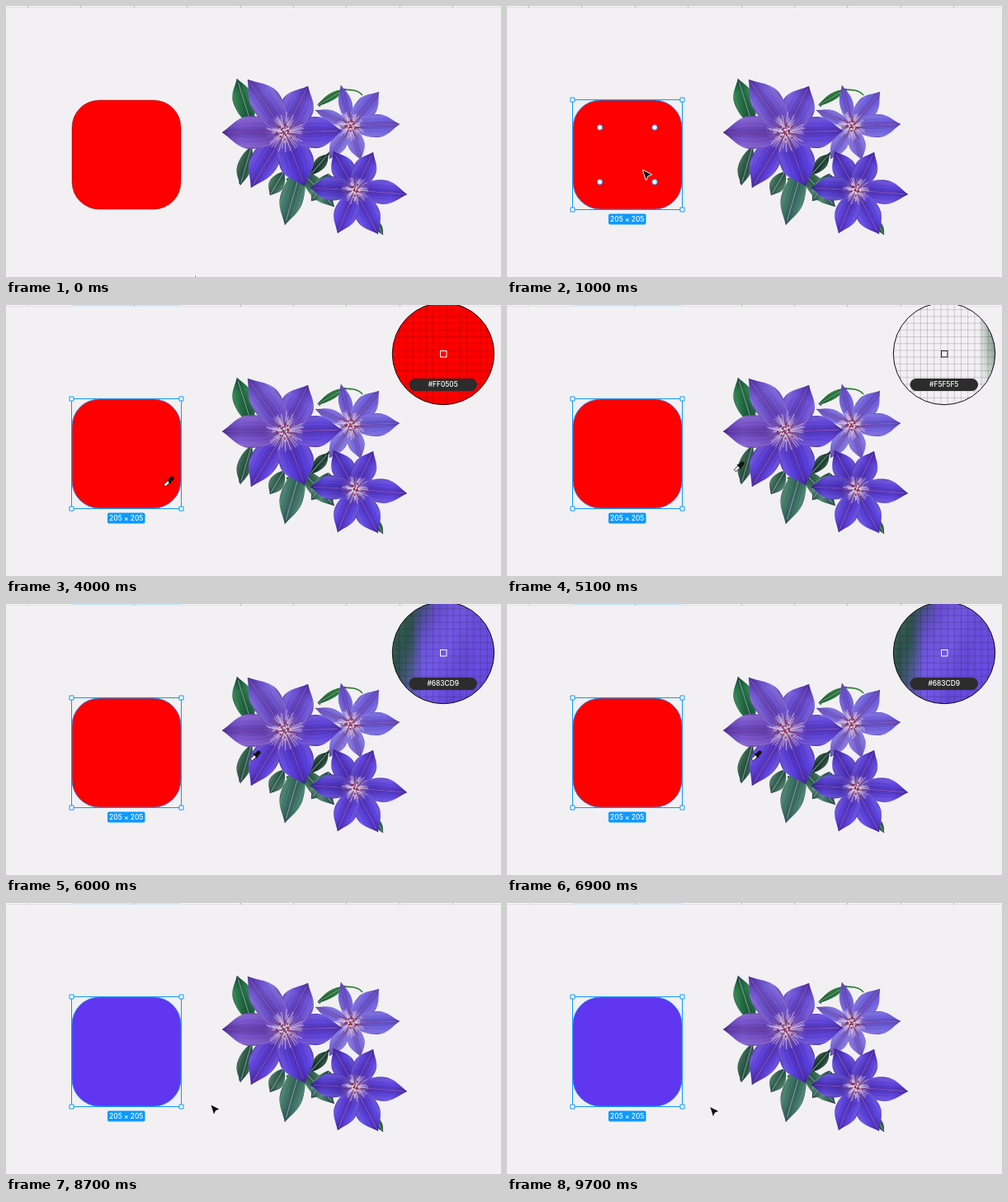
Write an HTML page with a canvas that moves like this. It is 600 px wide and 328 px high and loops after 9.8 s.

```html
<!DOCTYPE html>
<html lang="en">
<head>
<meta charset="utf-8">
<title>Color picker</title>
<style>
html, body { margin: 0; width: 100%; height: 100%; overflow: hidden; background: #f2f0f2; }
canvas { display: block; width: 600px; height: 328px; }
</style>
</head>
<body>
<canvas id="stage" width="600" height="328"></canvas>
<script>
const W = 600, H = 328, LOOP = 9800, STEP = 100;
const BLUE = '#0d99ff';
const BOX = { x: 80, y: 114, s: 132, r: 33 };
const LOUPE = { x: 530, y: 59, r: 61.7, cell: 8.2 };

const stage = document.getElementById('stage').getContext('2d');
const makeLayer = () => {
  const c = document.createElement('canvas');
  c.width = W;
  c.height = H;
  return c.getContext('2d');
};
const bouquet = makeLayer();
const scene = makeLayer();

let seed = 7;
const rand = () => (seed = (seed * 16807) % 2147483647) / 2147483647;

// One edge of a blade from base to pointed tip; w is its signed half width.
function edge(g, len, w) {
  g.moveTo(0, 0);
  g.lineTo(0, w * .2);
  g.bezierCurveTo(len * .2, w * .85, len * .38, w, len * .55, w);
  g.bezierCurveTo(len * .74, w, len * .85, w * .4, len, 0);
}

// Pointed leaf or petal; a and b are the half widths left and right of its axis.
function blade(x0, y0, x1, y1, a, b, inner, outer, rib = '#a04fc0') {
  const g = bouquet, len = Math.hypot(x1 - x0, y1 - y0);
  g.save();
  g.translate(x0, y0);
  g.rotate(Math.atan2(y1 - y0, x1 - x0));
  const fill = g.createLinearGradient(0, 0, len, 0);
  fill.addColorStop(.15, inner);
  fill.addColorStop(.7, outer);
  fill.addColorStop(1, inner);
  for (const w of [-a, b]) {
    g.beginPath();
    edge(g, len, w);
    g.closePath();
    g.fillStyle = fill;
    g.fill();
    const shade = g.createLinearGradient(0, 0, 0, w);
    shade.addColorStop(0, 'rgba(25,0,70,.3)');
    shade.addColorStop(.4, 'rgba(25,0,70,.03)');
    shade.addColorStop(.8, 'rgba(255,255,255,.1)');
    shade.addColorStop(1, 'rgba(25,0,70,.3)');
    g.fillStyle = shade;
    g.fill();
    for (const k of [.3, .55, .8]) {
      g.beginPath();
      edge(g, len, w * k);
      g.lineWidth = .5;
      g.strokeStyle = 'rgba(35,10,110,.22)';
      g.stroke();
    }
  }
  g.beginPath();
  g.moveTo(0, 0);
  g.lineTo(len * .92, 0);
  g.globalAlpha = .55;
  g.lineWidth = 1.2;
  g.strokeStyle = rib;
  g.stroke();
  g.restore();
}

function stamens(x, y, size) {
  const g = bouquet;
  const glow = g.createRadialGradient(x, y, 0, x, y, size);
  glow.addColorStop(0, 'rgba(170,110,150,.8)');
  glow.addColorStop(.5, 'rgba(150,115,190,.55)');
  glow.addColorStop(1, 'rgba(140,110,210,0)');
  g.fillStyle = glow;
  g.fillRect(x - size, y - size, size * 2, size * 2);
  for (let i = 0; i < 64; i++) {
    const angle = i * 2.4, r = size * (.5 + .5 * rand());
    g.beginPath();
    g.moveTo(x + Math.cos(angle) * 2, y + Math.sin(angle) * 2);
    g.lineTo(x + Math.cos(angle) * r, y + Math.sin(angle) * r);
    g.lineWidth = .9;
    g.strokeStyle = i % 3 ? 'rgba(228,214,238,.75)' : 'rgba(100,45,115,.75)';
    g.stroke();
  }
  for (let i = 0; i < 22; i++) {
    const angle = i * 2.4, r = size * .4 * rand();
    g.fillStyle = i % 3 ? '#8d2844' : '#e6cbd4';
    g.fillRect(x + Math.cos(angle) * r - 1, y + Math.sin(angle) * r - 1, 2, 2);
  }
}

function flower(x, y, size, petals) {
  petals.forEach(p => blade(x, y, ...p));
  stamens(x, y, size);
}

function stem(color, width, x0, y0, ...curve) {
  bouquet.beginPath();
  bouquet.moveTo(x0, y0);
  bouquet.bezierCurveTo(...curve);
  bouquet.strokeStyle = color;
  bouquet.lineWidth = width;
  bouquet.stroke();
}

function paintBouquet() {
  const rib = '#8fc0a0';
  stem('#2a7a30', 1.6, 380, 122, 386, 100, 424, 96, 432, 108);
  stem('#2c5a3a', 1.5, 296, 172, 286, 180, 284, 205, 283, 215);
  stem('#2c5a3a', 2.5, 340, 210, 365, 205, 385, 185, 395, 175);
  blade(297, 142, 280, 88, 13, 12, '#1c6a38', '#2a8547', rib);
  blade(378, 120, 412, 100, 4, 4, '#1d7426', '#2a8a34', rib);
  blade(297, 172, 284, 217, 7, 10, '#356b4c', '#2f6243', rib);
  blade(336, 202, 320, 229, 9, 9, '#2f6a48', '#44785a', rib);
  blade(358, 196, 338, 265, 13, 15, '#3a7a5c', '#447f68', rib);
  blade(358, 200, 398, 243, 11, 11, '#2c6245', '#4f8a70', rib);
  blade(392, 204, 370, 236, 13, 9, '#2f6b4a', '#5a9678', rib);
  blade(370, 203, 391, 179, 7, 7, '#183c24', '#245234', rib);
  blade(446, 256, 457, 277, 4, 4, '#2a5f38', '#33703f', rib);

  flower(418, 145, 19, [
    [392, 185, 9, 10, '#8c7ce4', '#8075e6'],
    [430, 186, 10, 10, '#8a7ae2', '#8072e6'],
    [375, 126, 7, 8, '#8272dc', '#7d70e2'],
    [406, 96, 8, 8, '#7a68dc', '#7060e0'],
    [452, 104, 13, 13, '#7e6cde', '#7465e4'],
    [477, 143, 13, 15, '#7a68dc', '#7466e6']
  ]);
  flower(338, 153, 25, [
    [297, 220, 14, 20, '#6040c8', '#6245e4'],
    [362, 218, 22, 20, '#5a3cc8', '#5c42e6'],
    [262, 153, 20, 20, '#7048bc', '#7f5bd2'],
    [407, 151, 18, 20, '#6545cc', '#6248e2'],
    [366, 97, 20, 20, '#6546c6', '#7358de'],
    [293, 89, 16, 21, '#6a4ac4', '#7860da']
  ]);
  flower(423, 223, 18, [
    [397, 176, 14, 14, '#4c34b8', '#5c44dc'],
    [445, 177, 14, 14, '#5238c0', '#6448e2'],
    [486, 228, 15, 14, '#5a3ecc', '#644ae6'],
    [451, 276, 15, 15, '#5a40d0', '#6048ea'],
    [402, 275, 14, 14, '#5a40d0', '#6248e8'],
    [369, 220, 14, 15, '#4c34b6', '#5c46da']
  ]);
}

const path = [
  [0, 229, 327], [900, 165, 200], [1200, 165, 196], [1800, 180, 214],
  [2400, 180, 214], [3000, 192, 219], [4200, 192, 219], [5000, 276, 201],
  [5200, 276, 201], [5900, 297, 189], [8000, 297, 189], [8800, 246.3, 247], [LOOP, 246.3, 247]
];

function pointerAt(t) {
  const i = path.findIndex(k => k[0] > t);
  const [t0, x0, y0] = path[i - 1], [t1, x1, y1] = path[i];
  const p = (t - t0) / (t1 - t0), e = p * p * (3 - 2 * p);
  return [x0 + (x1 - x0) * e, y0 + (y1 - y0) * e];
}

const inside = (x, y, l, t, r, b) => x >= l && x <= r && y >= t && y <= b;

function roundRect(g, x, y, w, h, r) {
  g.beginPath();
  g.roundRect(x, y, w, h, r);
}

function pill(x, y, w, h, r, color, text) {
  const g = stage;
  roundRect(g, x, y, w, h, r);
  g.fillStyle = color;
  g.fill();
  g.font = '500 8.4px Inter, sans-serif';
  g.textAlign = 'center';
  g.textBaseline = 'middle';
  g.fillStyle = '#fff';
  g.fillText(text, x + w / 2, y + h / 2 + .2);
}

function paintScene(color, selected) {
  const g = scene;
  g.fillStyle = '#f2f0f2';
  g.fillRect(0, 0, W, H);
  g.drawImage(bouquet.canvas, 0, 0);
  roundRect(g, BOX.x, BOX.y, BOX.s, BOX.s, BOX.r);
  g.fillStyle = color;
  g.fill();
  g.lineWidth = .8;
  g.strokeStyle = selected ? BLUE : 'rgba(50,0,0,.45)';
  g.stroke();
}

function paintRuler(marked) {
  const g = stage;
  g.fillStyle = '#fafafa';
  g.fillRect(0, 0, W, 1);
  g.fillStyle = '#e0dfe0';
  g.fillRect(0, 1, W, 1);
  if (marked) {
    g.fillStyle = '#cfeafb';
    g.fillRect(80, 0, 132, 2);
  }
  for (let i = 0; i < 9; i++) {
    if (marked && (i === 1 || i === 3)) continue;
    g.fillStyle = marked && !i ? '#d8d8d8' : '#b4b4b4';
    g.fillRect(Math.round(26 + i * 64.4), 0, 1, 2);
  }
}

function paintSelection(handles) {
  const g = stage, l = 79.5, t = 113.5, s = 133;
  g.strokeStyle = BLUE;
  g.lineWidth = 1;
  g.strokeRect(l, t, s, s);
  g.fillStyle = '#fff';
  for (const dx of [0, 1]) for (const dy of [0, 1]) {
    g.beginPath();
    g.rect(l + dx * s - 2.5, t + dy * s - 2.5, 5, 5);
    g.fill();
    g.stroke();
    if (!handles) continue;
    g.beginPath();
    g.arc(112.5 + dx * 66.5, 147 + dy * 66, 3.2, 0, 7);
    g.fill();
    g.stroke();
  }
  pill(123, 251.5, 45.5, 13, 2, BLUE, '205 × 205');
}

function paintLoupe(x, y, label) {
  const g = stage, { x: cx, y: cy, r, cell } = LOUPE, span = r / cell;
  g.save();
  g.beginPath();
  g.arc(cx, cy, r, 0, 7);
  g.clip();
  g.drawImage(scene.canvas, x - span / 2, y - span / 2, span, span, cx - r, cy - r, 2 * r, 2 * r);
  g.beginPath();
  for (let k = -7.5; k <= 7.5; k++) {
    g.moveTo(cx + k * cell, cy - r);
    g.lineTo(cx + k * cell, cy + r);
    g.moveTo(cx - r, cy + k * cell);
    g.lineTo(cx + r, cy + k * cell);
  }
  g.strokeStyle = 'rgba(0,0,0,.2)';
  g.lineWidth = .8;
  g.stroke();
  g.restore();
  g.beginPath();
  g.arc(cx, cy, r, 0, 7);
  g.strokeStyle = '#111';
  g.lineWidth = 1;
  g.stroke();
  g.strokeStyle = label === '#F5F5F5' ? '#222' : '#fff';
  g.strokeRect(526.5, 55.5, 7.5, 7.5);
  pill(488.5, 89, 82.5, 15, 7.5, '#2c2c2c', label);
}

function paintArrow(x, y, arc) {
  const g = stage;
  g.save();
  g.translate(x, y);
  g.beginPath();
  [[0, 0], [3.6, 11.2], [5.6, 6.7], [10, 5]].forEach(p => g.lineTo(...p));
  g.closePath();
  g.lineJoin = 'round';
  g.strokeStyle = '#fff';
  g.lineWidth = 1.8;
  g.stroke();
  g.fillStyle = '#111';
  g.fill();
  if (arc) for (const [color, width] of [['#fff', 3], ['#111', 1.3]]) {
    g.beginPath();
    g.moveTo(7, 17);
    g.quadraticCurveTo(7.5, 12, 13, 11.5);
    g.strokeStyle = color;
    g.lineWidth = width;
    g.stroke();
  }
  g.restore();
}

function paintDropper(x, y) {
  const g = stage;
  g.save();
  g.translate(x, y);
  g.rotate(-Math.PI / 4);
  roundRect(g, .5, -1.7, 8.5, 3.4, 1.2);
  g.fillStyle = '#fff';
  g.fill();
  g.strokeStyle = '#111';
  g.lineWidth = .9;
  g.stroke();
  g.fillStyle = '#111';
  g.fillRect(7, -3.3, 2, 6.6);
  roundRect(g, 8, -2.4, 7.5, 4.8, 2.4);
  g.fill();
  g.restore();
}

const hexAt = t => t < 4500 ? '#FF0505' : t < 5500 ? '#F5F5F5' : t < 5800 ? '#5C8A70' : '#683CD9';

function draw(t) {
  const [x, y] = pointerAt(t);
  const selected = t >= 1000;
  const picking = t >= 3500 && t < 7200;
  const onRadius = t >= 1800 && t < 2700;
  const overBox = inside(x, y, BOX.x, BOX.y, BOX.x + BOX.s, BOX.y + BOX.s);
  paintScene(t < 7200 ? '#ff0000' : '#6036f0', selected || overBox);
  stage.drawImage(scene.canvas, 0, 0);
  paintRuler(t >= 1100);
  if (selected) paintSelection(overBox && !picking);
  if (onRadius) pill(127.5, 191.5, 44.5, 13.5, 2, BLUE, 'Radius 51');
  if (!picking && inside(x, y, 256, 85, 490, 279)) {
    stage.strokeStyle = BLUE;
    stage.lineWidth = 1.7;
    stage.strokeRect(256.3, 85.8, 234, 193.6);
  }
  if (picking) {
    paintLoupe(x, y, hexAt(t));
    paintDropper(x, y);
  } else {
    paintArrow(x, y, onRadius);
  }
}

paintBouquet();
const start = performance.now();
function tick() {
  const t = (performance.now() - start) % LOOP;
  draw(Math.floor(t / STEP) * STEP);
  requestAnimationFrame(tick);
}
tick();
</script>
</body>
</html>
```
